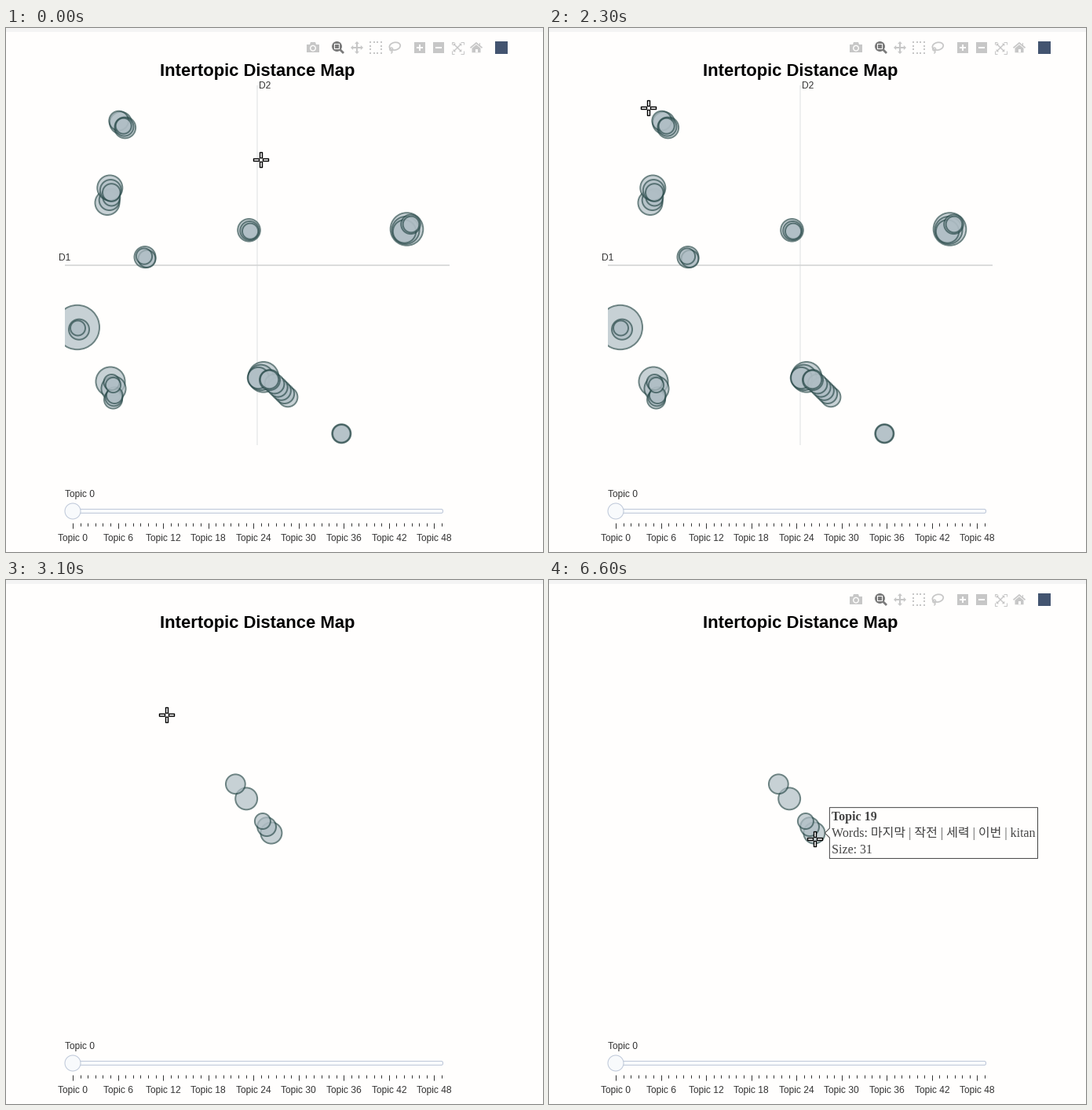
A matplotlib script that plays this animation: 684x667 px, repeating every 8000 ms.

```python
import numpy as np
import matplotlib.pyplot as plt
from matplotlib.animation import FuncAnimation
from matplotlib.collections import LineCollection
from matplotlib.patches import (Circle, Ellipse, FancyBboxPatch, PathPatch,
                                Polygon, Rectangle, Wedge)
from matplotlib.path import Path
from matplotlib.transforms import Affine2D

W, H, DPI = 684, 667, 64
STEP, LOOP = 100, 8000
DRAG_START, RELEASE = 2300, 3100
PT = 72 / DPI  # points per pixel

BG, INK, GREY, ACTIVE = "#fffefd", "#333333", "#c7c7c7", "#7b7b7b"
FILL, EDGE, TIP_INK = "#b0bec5", "#2f4f4f", "#444444"
RAIL_FILL, RAIL_EDGE = "#f8fafc", "#bec8d9"
X0, Y0, X1, Y1 = 75, 73, 565, 531            # plot area
ZX0, ZY0, ZX1, ZY1 = 106, 92, 191, 156       # zoom selection

fig = plt.figure(figsize=(W / DPI, H / DPI), dpi=DPI, facecolor=BG)
ax = fig.add_axes([0, 0, 1, 1])
ax.set(xlim=(0, W), ylim=(H, 0))
ax.axis("off")


def add(patch, z=1):
    patch.set_zorder(z)
    return ax.add_patch(patch)


def rect(x0, y0, x1, y1, color, z=1):
    return add(Rectangle((x0, y0), x1 - x0, y1 - y0, fc=color, ec="none"), z)


def square(x, y, half, color, z=1):
    return rect(x - half, y - half, x + half, y + half, color, z)


def disc(x, y, r, color, z=1):
    return add(Circle((x, y), r, fc=color, ec="none"), z)


def poly(points, color, z=1):
    return add(Polygon(points, fc=color, ec="none"), z)


def line(xs, ys, color, width=1, z=1):
    return ax.plot(xs, ys, color=color, lw=width * PT, zorder=z,
                   solid_capstyle="butt", solid_joinstyle="miter")[0]


def text(x, y, s, px=12, z=1, color=INK, family="Liberation Sans", **kw):
    return ax.text(x, y, s, fontsize=px * PT, color=color, family=family,
                   va="baseline", zorder=z, **kw)


def show(artists, on):
    for a in artists:
        a.set_visible(on)


def progress(t, t0, t1):
    return min(max((t - t0) / (t1 - t0), 0), 1)


def smooth(u):
    return u * u * (3 - 2 * u)


# ---------------------------------------------------------------- page, title
rect(0, 0, W, 5, "#f4f4f4")
text(320, 61, "Intertopic Distance Map", 22, color="black", weight="bold",
     ha="center")

full_view = [
    line([320, 320], [Y0, Y1], "#e9ebeb", 1.5, 2),
    line([X0, X1], [302, 302], "#d0d2d2", 1.5, 2),
    text(67, 296, "D1", z=4),
    text(322, 77, "D2", z=4),
]
zoom_view = []

# --------------------------------------------------------------------- slider
text(X0, 597, "Topic 0")
add(FancyBboxPatch((77.5, 614.5), 477, 1, fc=RAIL_FILL, ec=RAIL_EDGE, lw=PT,
                   boxstyle="round,pad=2,rounding_size=2"))
add(Circle((85, 615), 10, fc=RAIL_FILL, ec=RAIL_EDGE, lw=PT), 2)
ticks = []
for i in range(50):
    x = 85 + 9.592 * i
    mark = np.floor(x - 0.5) + 0.5
    ticks.append([(mark, 630), (mark, 634 if i % 6 else 637)])
    if i % 6 == 0:
        text(x, 653, f"Topic {i}", ha="center")
ax.add_collection(LineCollection(ticks, colors=INK, linewidths=PT))


# -------------------------------------------------------------------- toolbar
def camera(x, y):
    rect(x - 8, y - 4.5, x + 8, y + 6, GREY)
    poly([(x - 4, y - 4), (x - 3, y - 7), (x + 3, y - 7), (x + 4, y - 4)], GREY)
    disc(x, y + 0.7, 4, BG, 2)
    disc(x, y + 0.7, 2.6, GREY, 3)


def magnifier(x, y):
    line([x, x + 7], [y, y + 7], ACTIVE, 2.8)
    disc(x - 1.5, y - 1.5, 6.5, ACTIVE, 2)
    square(x - 1.5, y - 1.5, 3.5, BG, 3)
    square(x - 1.5, y - 1.5, 2.5, ACTIVE, 4)


def pan(x, y):
    line([x - 6, x + 6], [y, y], GREY, 2)
    line([x, x], [y - 6, y + 6], GREY, 2)
    for dx, dy in ((1, 0), (-1, 0), (0, 1), (0, -1)):
        bx, by = x + 4.8 * dx, y + 4.8 * dy
        poly([(x + 8 * dx, y + 8 * dy), (bx + 3 * dy, by + 3 * dx),
              (bx - 3 * dy, by - 3 * dx)], GREY)


def select_box(x, y):
    offsets = np.linspace(-6.86, 6.86, 4)
    for u in offsets:
        for v in offsets:
            if max(abs(u), abs(v)) > 6:
                square(x + u, y + v, 1.15, GREY)


def lasso(x, y):
    add(Ellipse((x + 0.3, y - 1.8), 14, 9.6, angle=-12, fc="none", ec=GREY,
                lw=1.7 * PT))
    add(Circle((x - 4.3, y + 2), 2, fc="none", ec=GREY, lw=1.3 * PT))
    line([x - 4, x - 3, x - 4.5], [y + 3.5, y + 5.5, y + 7.5], GREY, 1.5)


def zoom_button(x, y, plus):
    square(x, y, 7, GREY)
    rect(x - 4, y - 1.1, x + 4, y + 1.1, BG, 2)
    if plus:
        rect(x - 1.1, y - 4, x + 1.1, y + 4, BG, 2)


def autoscale(x, y):
    for sx in (-1, 1):
        for sy in (-1, 1):
            line([x + 4 * sx, x + 7.5 * sx, x + 7.5 * sx],
                 [y + 7.5 * sy, y + 7.5 * sy, y + 4 * sy], GREY)
            line([x, x + 4 * sx], [y, y + 4 * sy], GREY, 1.4)
            poly([(x + 5.3 * sx, y + 5.3 * sy), (x + 1.8 * sx, y + 5.3 * sy),
                  (x + 5.3 * sx, y + 1.8 * sy)], GREY)


def home(x, y):
    line([x - 7.5, x, x + 7.5], [y + 0.3, y - 6, y + 0.3], GREY, 1.7)
    rect(x + 3.6, y - 6, x + 5.4, y - 2, GREY)
    poly([(x - 5.5, y + 0.8), (x, y - 3.8), (x + 5.5, y + 0.8),
          (x + 5.5, y + 6.3), (x - 5.5, y + 6.3)], GREY)
    rect(x - 1.5, y + 2.4, x + 1.5, y + 6.5, BG, 2)


camera(391, 25)
magnifier(423, 25)
pan(447, 25)
select_box(471, 25)
lasso(495, 25)
zoom_button(527, 25, True)
zoom_button(551, 25, False)
autoscale(575, 25)
home(599, 25)
square(631, 25, 8, "#435470")
veil = rect(380, 14, 642, 36, BG, 5)

# -------------------------------------------------------------------- bubbles
plot_clip = Rectangle((X0, Y0), X1 - X0, Y1 - Y0, transform=ax.transData)


def zoomed(x, y):
    return (X0 + (x - ZX0) * (X1 - X0) / (ZX1 - ZX0),
            Y0 + (y - ZY0) * (Y1 - Y0) / (ZY1 - ZY0))


def radius(size):
    return 2.425 * np.sqrt(size)


def bubble(x, y, r):
    parts = [Circle((x, y), r - 0.8, fc=FILL, ec="none", alpha=0.7),
             Wedge((x, y), r + 1, 0, 360, width=2, fc=EDGE, ec="none",
                   alpha=0.7)]
    for p in parts:
        add(p, 3).set_clip_path(plot_clip)
    return parts


def chain(x, y, r, dx=0, dy=0, n=2, shrink=0.84):
    """Overlapping bubbles in even steps, each smaller than the last."""
    for k in range(n):
        full_view.extend(bubble(x + k * dx, y + k * dy, r * shrink ** k))


# topic: x, y, size, words
TOPICS = {
    17: (146.1, 120.7, 33, "특별 | 500 | 작전 | 회복 | 기정"),
    19: (151.6, 126.8, 31, "마지막 | 작전 | 세력 | 이번 | kitan"),
    20: (177.0, 291.6, 31, "업데이트 | 캐릭터 | 시작 | 보상 | 확인"),
    27: (143.7, 118.1, 26, "기정 | 보방 | 특별 | 11 | 15"),
    31: (150.6, 125.7, 24, "eldkx | 염승 | 500 | 특별 | 회복"),
    47: (149.7, 124.7, 17, "eldkx | 염승 | 500 | 특별 | 회복"),
}
for x, y, size, _ in TOPICS.values():
    full_view += bubble(x, y, radius(size))
    if ZX0 < x < ZX1 and ZY0 < y < ZY1:
        zoom_view += bubble(*zoomed(x, y), radius(size))

chain(129, 222.5, 15.5, 2.7, -3.5, 3)
chain(132.3, 203.5, 16, 1, 3, 3)
chain(179.5, 293.8, 11, -3.5, -3.2, shrink=0.92)
chain(309.5, 257.3, 14.3, 0.8, 0.7, 3)
chain(510.5, 256, 20.8, -1.5, 1.5, 3)
chain(515.5, 249.8, 12.3, 0.5, 0.2)
chain(90.8, 381, 28.2, n=1)
chain(93, 383.7, 13, -1.5, -1.7, shrink=0.73)
chain(133, 450, 18.5, 4, 9)
chain(136.5, 473, 11.5, 0.9, -2.7, 3, shrink=0.95)
chain(134.5, 451, 10, 2, 3.5, shrink=0.96)
chain(328, 444.3, 19.3, -3.3, 0.6, 3)
chain(359, 469.8, 12.4, -4.25, -4.2, 5, shrink=1)
chain(336, 448, 13, -0.5, -0.5, shrink=0.9)
chain(427.3, 516.3, 12, shrink=0.94)


# ------------------------------------------------------------------- tooltips
def tooltip(topic, in_zoom):
    x, y, size, words = TOPICS[topic]
    if in_zoom:
        x, y = zoomed(x, y)
    tip = x + radius(size)
    left = tip + 6
    lines = [f"Topic {topic}", f"Words: {words}", f"Size: {size}"]
    texts = [text(left + 3, y - 15.6 + 20.8 * i, s, 16, 8, TIP_INK,
                  ["Liberation Serif", "Noto Sans CJK JP"],
                  weight="normal" if i else "bold")
             for i, s in enumerate(lines)]
    width = max(t.get_window_extent().width for t in texts)
    right = np.floor(left + 6 + width) + 0.5
    box = Polygon([(tip, y), (left, y - 6), (left, y - 32.4),
                   (right, y - 32.4), (right, y + 32.4), (left, y + 32.4),
                   (left, y + 6)], fc=BG, ec=TIP_INK, lw=PT)
    return [add(box, 7)] + texts


# start, end, artists
TIPS = [(t0, t1, tooltip(topic, t0 > RELEASE)) for t0, t1, topic in (
    (1300, 1400, 20), (1400, 1500, 47), (1500, 1800, 27), (4100, 4300, 27),
    (4300, 5300, 17), (5300, 5600, 31), (5600, 6500, 47), (6500, LOOP, 19))]


# ------------------------------------------------------------------ zoom drag
def ring(points):
    codes = [Path.MOVETO] + [Path.LINETO] * (len(points) - 1) + [Path.CLOSEPOLY]
    return Path(list(points) + [points[0]], codes)


def box_ring(x0, y0, x1, y1, flip=False):
    pts = [(x0, y0), (x1, y0), (x1, y1), (x0, y1)]
    return ring(pts[::-1] if flip else pts)


def corner(x, y, sx, sy):
    pts = [(0, 0), (0, 9.5), (-3, 9.5), (-3, -3), (10, -3), (10, 0)]
    return ring([(x + sx * u, y + sy * v) for u, v in pts])


shade = add(PathPatch(box_ring(X0, Y0, X1, Y1), fc="black", ec="none"), 5)
handles = add(PathPatch(box_ring(0, 0, 1, 1), fc="white", ec=TIP_INK,
                        lw=PT), 6)


def draw_drag(t, x, y):
    on = DRAG_START < t < RELEASE
    show([shade, handles], on)
    if not on:
        return
    x -= 5 * (1 - progress(t, DRAG_START + STEP, 2700))
    if y - ZY0 < 20:  # a flat drag selects a full-height strip
        hole = (ZX0, Y0, x, Y1)
        grips = [box_ring(u, 71.5, u + 3, 112.5) for u in (ZX0 - 3.5, x + 0.5)]
    else:
        hole = (ZX0, ZY0, x, y)
        grips = [corner(cx, cy, sx, sy) for cx, sx in ((ZX0 - 0.5, 1), (x, -1))
                 for cy, sy in ((ZY0 + 0.5, 1), (y, -1))]
    shade.set_path(Path.make_compound_path(
        box_ring(X0, Y0, X1, Y1), box_ring(*hole, flip=True)))
    shade.set_alpha(0.4 * smooth(progress(t, DRAG_START, 2600)))
    handles.set_path(Path.make_compound_path(*grips))
    handles.set_alpha(progress(t, DRAG_START, 2500))


# --------------------------------------------------------------------- cursor
arms = Path.make_compound_path(
    box_ring(-9.5, -1.5, -2.5, 1.5), box_ring(2.5, -1.5, 9.5, 1.5),
    box_ring(-1.5, -9.5, 1.5, -2.5), box_ring(-1.5, 2.5, 1.5, 9.5))
cursor = add(PathPatch(arms, fc="white", ec="black", lw=1.4 * PT,
                       joinstyle="round"), 9)

# start, end, where the move leads
MOVES = [
    (100, 1000, 191, 314), (1000, 1100, 165, 291), (1200, 1400, 150, 157),
    (1400, 1600, 146, 117), (1700, 1900, ZX0, ZY0), (2200, 2400, 146, 110),
    (2400, 2700, ZX1, ZY1), (3000, 3700, 284, 259), (4000, 4600, 302, 279),
    (5000, 5100, 308, 290), (5200, 5300, 317, 311), (5400, 5500, 319, 318),
    (5500, 5700, 316, 313), (6100, 6200, 324, 309), (6300, 6600, 338, 329)]


def pointer(t):
    pos = np.array([324.0, 167.0])
    for t0, t1, *goal in MOVES:
        pos += (goal - pos) * progress(t, t0, t1)
    return np.round(pos)


def update(i):
    t = i * STEP
    x, y = pointer(t)
    show(full_view, t < RELEASE)
    show(zoom_view, t >= RELEASE)
    for t0, t1, parts in TIPS:
        show(parts, t0 <= t < t1)
    draw_drag(t, x, y)
    veil.set_alpha(progress(t, DRAG_START, 2500) - progress(t, RELEASE, 3400))
    cursor.set_transform(Affine2D().translate(x, y) + ax.transData)
    return []


anim = FuncAnimation(fig, update, frames=LOOP // STEP, interval=STEP,
                     repeat=True, repeat_delay=0, blit=False)
plt.show()
```
